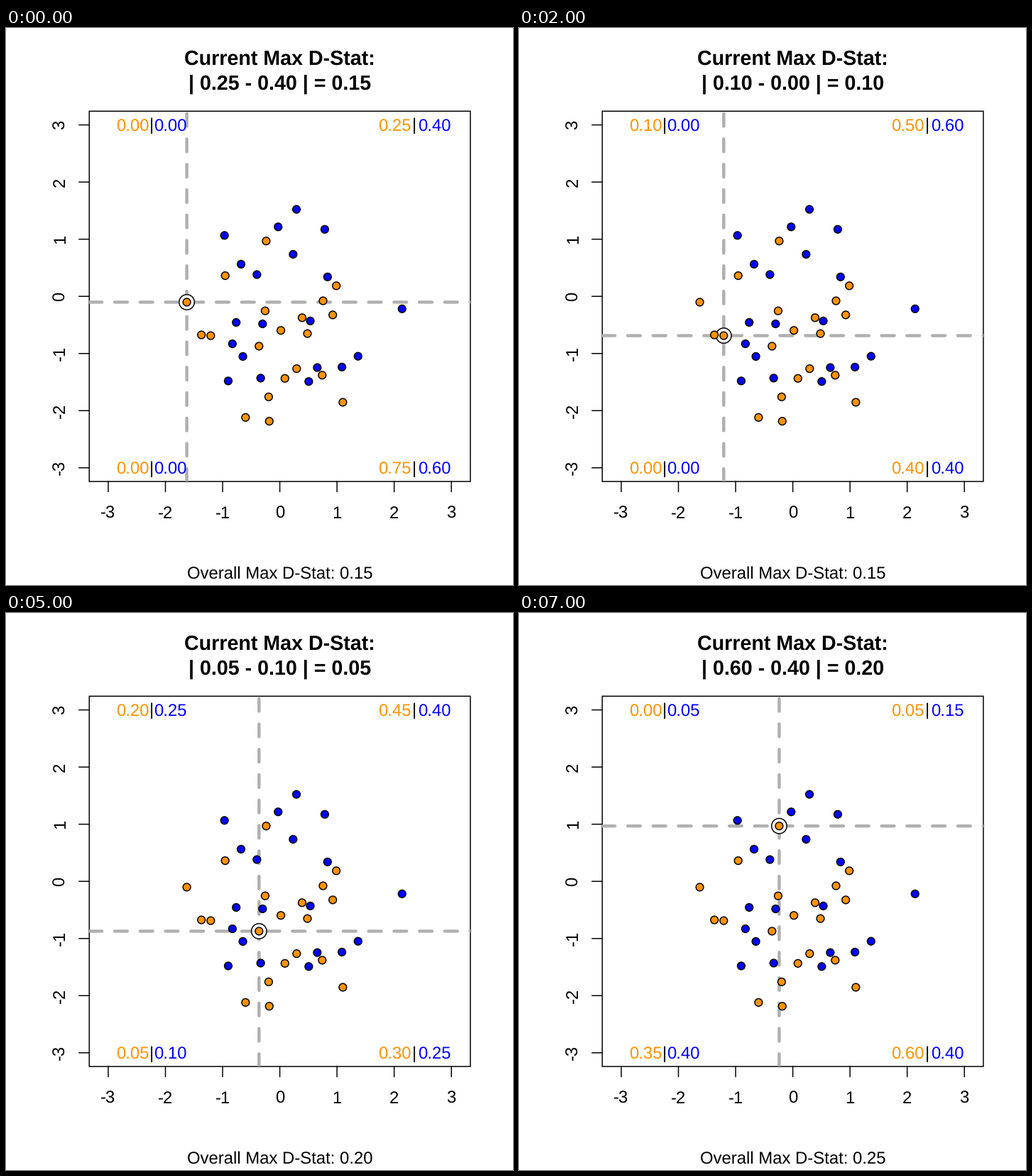
Animation, 714 px wide and 785 px high, one loop 8 s. Source, as a matplotlib script:

```python
import math

import matplotlib.pyplot as plt
import numpy as np
from matplotlib.animation import FuncAnimation
from matplotlib.patches import Circle, Rectangle

W, H, DPI = 714, 785, 100
PT = 72 / DPI                      # points per pixel
LINE = 28.6                        # height of one margin line
LEFT, RIGHT = 4.1 * LINE, W - 2.1 * LINE
TOP, BOTTOM = 4.1 * LINE, H - 5.1 * LINE
CX, CY = (LEFT + RIGHT) / 2, (TOP + BOTTOM) / 2
UNIT = (BOTTOM - TOP) / 6.48
TEXT, STROKE, DOT = 23.83, 1.49, 5.36
ORANGE, BLUE, GRAY = "#ff9300", "#0000ff", "#b0b0b0"
STEPS, SAMPLES, SEED = 8, 20, 10


def normals(n, seed):
    """Normal deviates by inversion, from a Mersenne Twister seeded by an LCG."""
    state = []
    for _ in range(50 + 625):
        seed = (69069 * seed + 1) % 2**32
        state.append(seed)
    rng = np.random.RandomState()
    rng.set_state(("MT19937", np.array(state[51:], dtype=np.uint32), 624))
    u = rng.randint(0, 2**32, size=(n, 2), dtype=np.uint32) / 2**32
    p = (np.floor(u[:, 0] * 2**27) + u[:, 1]) / 2**27
    z = np.linspace(-5, 5, 4001)
    cdf = [(1 + math.erf(v / math.sqrt(2))) / 2 for v in z]
    return np.interp(p, cdf, z)


# Two samples, each a row of x values and a row of y values
oranges, blues = normals(4 * SAMPLES, SEED).reshape(2, 2, SAMPLES)
oranges = oranges[:, np.argsort(oranges[0])]

plt.rcParams.update({"font.family": "Liberation Sans", "text.hinting": "none",
                     "path.snap": False})
fig = plt.figure(figsize=(W / DPI, H / DPI), dpi=DPI, facecolor="white")
ax = fig.add_axes([0, 0, 1, 1])
ax.set(xlim=(0, W), ylim=(H, 0))
ax.axis("off")


def to_stage(x, y):
    return CX + x * UNIT, CY - y * UNIT


def label(x, y, s="", size=TEXT, **kw):
    return ax.text(x, y, s, fontsize=size * PT, ha="center", va="baseline",
                   rotation_mode="anchor", zorder=6, **kw)


def line(xs, ys, width=STROKE, color="black", **kw):
    return ax.plot(xs, ys, lw=width * PT, color=color, **kw)[0]


def dot(x, y, radius, fill, z):
    return ax.add_patch(Circle(to_stage(x, y), radius, fc=fill, ec="black",
                               lw=STROKE * PT, zorder=z))


def shares(sample, x, y):
    """Share of points in the upper left, upper right, lower left, lower right."""
    right, up = sample[0] >= x, sample[1] >= y
    quads = (~right & up, right & up, ~right & ~up, right & ~up)
    return [int(q.sum()) / SAMPLES for q in quads]


def best_split(x, y):
    pairs = list(zip(shares(oranges, x, y), shares(blues, x, y)))
    return pairs, max(pairs, key=lambda p: abs(p[0] - p[1]))


# Frame, ticks and tick labels
box = ax.add_patch(Rectangle((LEFT, TOP), RIGHT - LEFT, BOTTOM - TOP, fill=False,
                             lw=STROKE * PT, ec="black", zorder=1))
for v in range(-3, 4):
    x, y = to_stage(v, v)
    line([x, x], [BOTTOM, BOTTOM + LINE / 2], zorder=1)
    line([LEFT - LINE / 2, LEFT], [y, y], zorder=1)
    label(x, BOTTOM + 1.8 * LINE, str(v))
    label(LEFT - 1.2 * LINE, y, str(v), rotation=90)

# Cross-hair, marker ring and samples
dash = dict(width=3 * STROKE, color=GRAY, ls=(0, (4, 4)),
            dash_capstyle="round", zorder=2)
h_line = line([LEFT, RIGHT], [CY, CY], **dash)
v_line = line([CX, CX], [BOTTOM, TOP], **dash)
for ln in (h_line, v_line):
    ln.set_clip_path(box)
ring = dot(0, 0, 2 * DOT, "white", 3)
for sample, color in ((blues, BLUE), (oranges, ORANGE)):
    for x, y in sample.T:
        dot(x, y, DOT, color, 4)

# Quadrant shares, title and footer
corners = []
for y in (145.4, 628.8):
    for mid, gap in ((204.5, 26.5), (575.2, 27.8)):
        label(mid, y - 1.2, "|")
        corners.append((label(mid - gap, y, color=ORANGE),
                        label(mid + gap, y, color=BLUE)))
label(CX, 51.9, "Current Max D-Stat:", 1.2 * TEXT, weight="bold")
title = label(CX, 86.2, "", 1.2 * TEXT, weight="bold")
footer = label(CX, BOTTOM + 4.78 * LINE)


def draw(i):
    x, y = oranges[:, i]
    px, py = to_stage(x, y)
    h_line.set_ydata([py, py])
    v_line.set_xdata([px, px])
    ring.set_center((px, py))
    pairs, (a, b) = best_split(x, y)
    for texts, pair in zip(corners, pairs):
        for t, share in zip(texts, pair):
            t.set_text(f"{share:.2f}")
    title.set_text(f"| {a:.2f} - {b:.2f} | = {abs(a - b):.2f}")
    best = [best_split(*p)[1] for p in oranges.T[:i + 1]]
    overall = max(abs(p - q) for p, q in best)
    footer.set_text(f"Overall Max D-Stat: {overall:.2f}")
    return []


anim = FuncAnimation(fig, draw, frames=STEPS, interval=1000, repeat=True,
                     repeat_delay=0, blit=False)
plt.show()
```
